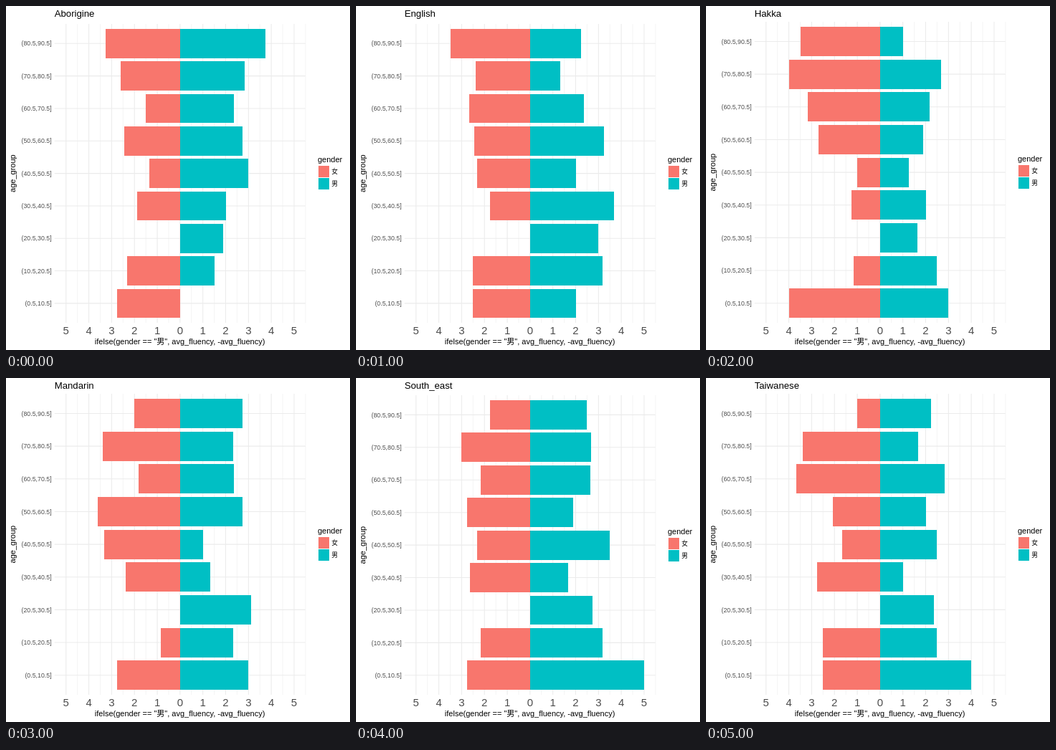
Recreate the animation shown at these times as an HTML page. Size 480 px wide and 480 px high, loop 6000 ms.

```html
<!DOCTYPE html>
<html lang="en">
<head>
<meta charset="utf-8">
<title>Fluency by age group</title>
<style>
  html, body { margin: 0; width: 100%; height: 100%; overflow: hidden; background: #fff; }
  svg { display: block; width: 480px; height: 480px; }
  text { font: 11px "Liberation Sans", "Noto Sans CJK TC", "Noto Sans CJK", sans-serif; fill: #000; }
  .title { font-size: 13.2px; }
  .label { font-size: 8.8px; fill: #4d4d4d; }
  .tick { font-size: 15px; fill: #4d4d4d; text-anchor: middle; }
  .key { font-size: 8.8px; }
  .mid { text-anchor: middle; }
  .end { text-anchor: end; }
  line { stroke: #ebebeb; stroke-width: 1.07; }
  line.minor { stroke-width: .53; }
  rect { shape-rendering: crispEdges; }
  .women { fill: #f8766d; }
  .men { fill: #00bfc4; }
  .chart { visibility: hidden; animation: show 6s step-end infinite; }
  @keyframes show {
    0% { visibility: visible; }
    16.66666%, 100% { visibility: hidden; }
  }
</style>
</head>
<body>
<svg id="stage" viewBox="0 0 480 480"></svg>
<script>
const LEFT = 67.7, RIGHT = 417.7, BOTTOM = 442.1, ZERO = 242.87, UNIT = 31.82;
const languages = ["Aborigine", "English", "Hakka", "Mandarin", "South_east", "Taiwanese"];

// Oldest group first: number of speakers, then their summed score per language.
const scores = {
  women: [
    [4, 13, 14, 14, 8, 7, 4],
    [5, 13, 12, 20, 17, 15, 17],
    [6, 9, 16, 19, 11, 13, 22],
    [13, 32, 32, 35, 47, 36, 27],
    [3, 4, 7, 3, 10, 7, 5],
    [8, 15, 14, 10, 19, 21, 22],
    [],
    [6, 14, 15, 7, 5, 13, 15],
    [4, 11, 10, 16, 11, 11, 10]
  ],
  men: [
    [4, 15, 9, 4, 11, 10, 9],
    [6, 17, 8, 16, 14, 16, 10],
    [11, 26, 26, 24, 26, 29, 31],
    [8, 22, 26, 15, 22, 15, 16],
    [4, 12, 8, 5, 4, 14, 10],
    [3, 6, 11, 6, 4, 5, 3],
    [8, 15, 24, 13, 25, 22, 19],
    [6, 9, 19, 15, 14, 19, 15],
    [1, 0, 2, 3, 3, 5, 4]
  ]
};

function average(gender, row, language) {
  const [speakers, ...totals] = scores[gender][row];
  return speakers ? totals[language] / speakers : 0;
}

const stage = document.getElementById("stage");

function add(parent, tag, attrs, content = "") {
  const node = document.createElementNS("http://www.w3.org/2000/svg", tag);
  for (const key in attrs) node.setAttribute(key, attrs[key]);
  node.textContent = content;
  return parent.appendChild(node);
}
const text = (parent, x, y, cls, content) => add(parent, "text", { x, y, class: cls }, content);
const line = (parent, x1, y1, x2, y2, cls) => add(parent, "line", { x1, y1, x2, y2, class: cls });
const box = (parent, x, y, width, height, cls) => add(parent, "rect", { x, y, width, height, class: cls });

// Letters below the baseline push the panel down.
const descent = title => /g/.test(title) ? 3 : /_/.test(title) ? 2 : 0;

function drawGrid(g, top, rowY) {
  const vertical = (v, cls) => line(g, ZERO + v * UNIT, top, ZERO + v * UNIT, BOTTOM, cls);
  for (let v = -4.5; v < 6; v++) vertical(v, "minor");
  for (let i = 0; i < 9; i++) line(g, LEFT, rowY(i), RIGHT, rowY(i), "major");
  for (let v = -5; v <= 5; v++) vertical(v, "major");
}

function drawLegend(g, middle) {
  text(g, 435, middle - 15.6, "", "gender");
  [["women", "女"], ["men", "男"]].forEach(([cls, name], i) => {
    const y = middle - 10.4 + i * 17.28;
    box(g, 435.6, y, 15.86, 15.86, cls);
    text(g, 454.2, y + 11, "key", name);
  });
}

function drawChart(name, language) {
  const g = add(stage, "g", { class: "chart", style: `animation-delay: ${language - 6}s` });
  const top = 22.1 + descent(name);
  const step = (BOTTOM - top) / 9.2;
  const rowY = i => top + (i + .6) * step;
  const middle = (top + BOTTOM) / 2;

  drawGrid(g, top, rowY);
  for (let i = 0; i < 9; i++) {
    const y = rowY(i), barTop = y - .45 * step, age = 80.5 - 10 * i;
    const women = average("women", i, language) * UNIT;
    const men = average("men", i, language) * UNIT;
    box(g, ZERO - women, barTop, women, .9 * step, "women");
    box(g, ZERO, barTop, men, .9 * step, "men");
    text(g, 63.6, y + 3.2, "label end", `(${age},${age + 10}]`);
  }
  text(g, 67.7, 15, "title", name);
  add(g, "text", { class: "mid", transform: `translate(13.3 ${middle}) rotate(-90)` }, "age_group");
  drawLegend(g, middle);
}

languages.forEach(drawChart);
for (let v = -5; v <= 5; v++) text(stage, ZERO + v * UNIT, 458, "tick", Math.abs(v));
text(stage, 242.6, 472, "mid", 'ifelse(gender == "男", avg_fluency, -avg_fluency)');
</script>
</body>
</html>
```
